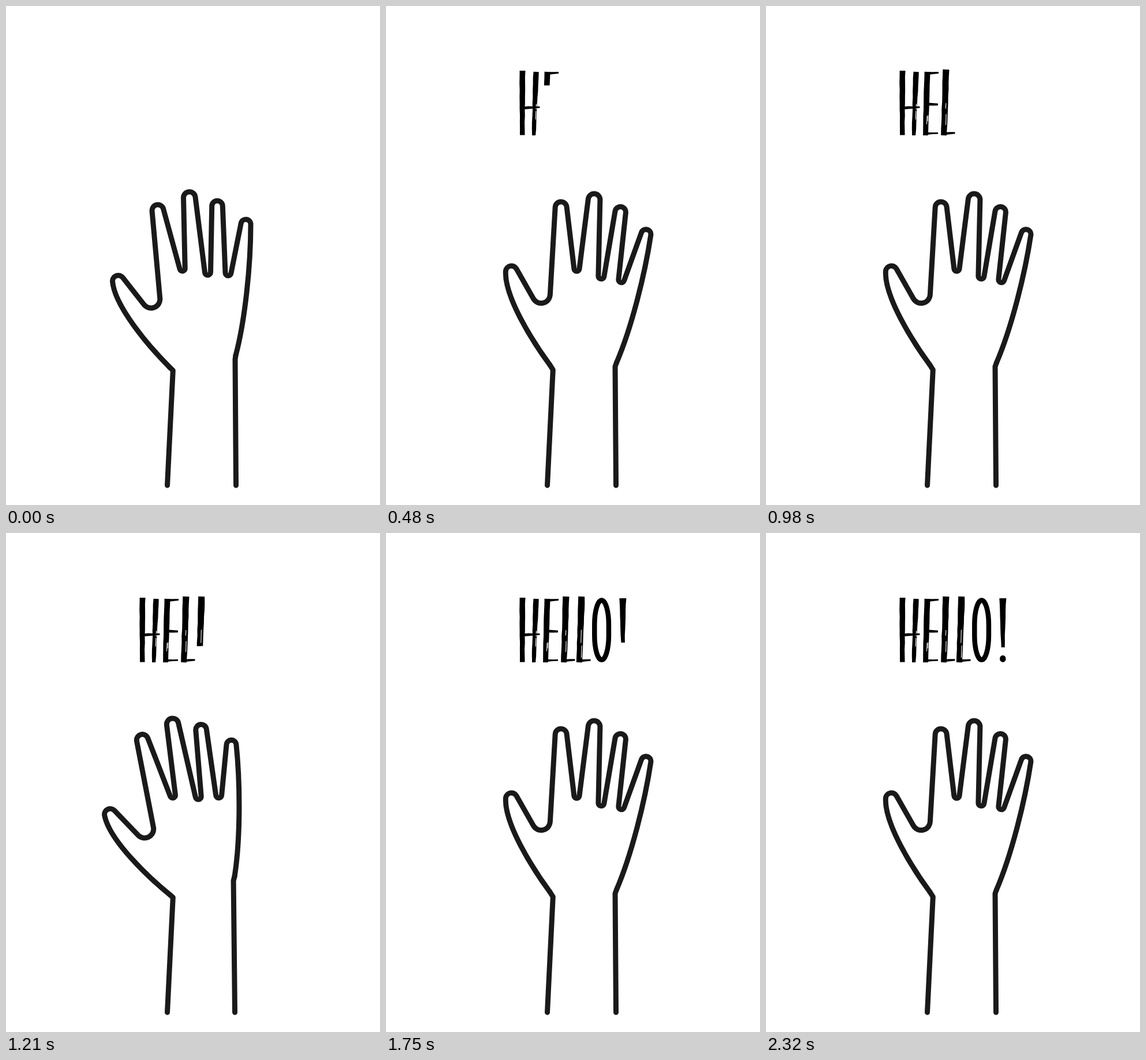
These frames come from a looping animation (648 px wide and 864 px high, 2420 ms). An HTML page:

```html
<!DOCTYPE html>
<html lang="en">
<head>
<meta charset="utf-8">
<title>Hello</title>
<style>
  html, body { margin: 0; width: 100%; height: 100%; overflow: hidden; background: #fff; }
  svg { display: block; width: 100%; height: 100%; }
  .line { fill: none; stroke: #1a1a1a; stroke-width: 9; stroke-linecap: round; stroke-linejoin: round; }
  .dry { fill: none; stroke: #fff; stroke-width: 1.1; stroke-linecap: round; }
  .ring { fill: none; stroke: #000; stroke-width: 8.5; }
</style>
</head>
<body>
<svg viewBox="0 0 648 864" role="img" aria-label="HELLO!">
  <g id="word"></g>
  <path id="hand" class="line"/>
  <path id="arms" class="line"/>
</svg>
<script>
const LOOP = 2420;
const $ = id => document.getElementById(id);
const hand = $("hand"), arms = $("arms"), word = $("word");

function add(parent, name, attrs = {}) {
  const el = document.createElementNS("http://www.w3.org/2000/svg", name);
  for (const key in attrs) el.setAttribute(key, attrs[key]);
  return parent.appendChild(el);
}

let seed = 7;
const rand = () => (seed = seed * 16807 % 2147483647) / 2147483647;
const mix = (a, b, k) => a + (b - a) * k;

// --- Lettering: tapered brush strokes with slightly rough edges ---
function brush(g, x0, y0, x1, y1, w0, w1) {
  const len = Math.hypot(x1 - x0, y1 - y0), steps = Math.ceil(len / 12);
  const nx = -(y1 - y0) / len, ny = (x1 - x0) / len;
  const near = [], far = [];
  for (let i = 0; i <= steps; i++) {
    const k = i / steps, x = mix(x0, x1, k), y = mix(y0, y1, k);
    const edge = () => mix(w0, w1, k) / 2 + rand() * 0.8 - 0.4;
    const a = edge(), b = edge();
    near.push([x + nx * a, y + ny * a]);
    far.unshift([x - nx * b, y - ny * b]);
  }
  add(g, "path", { d: "M" + [...near, ...far].join("L") + "Z" });
}

function stem(g, x0, y0, x1, y1, w0, w1, streaks = 2) {
  brush(g, x0, y0, x1, y1, w0, w1);
  for (let i = 0; i < streaks; i++) {
    const y = mix(y0, y1, 0.45 + rand() * 0.3), x = mix(x0, x1, 0.7) + 1.5 + rand() * 2;
    add(g, "path", { class: "dry", d: `M${x} ${y}l-.5 ${8 + rand() * 14}` });
  }
}

const bar = (g, x0, y0, x1, y1) => brush(g, x0, y0, x1, y1, 5, 3);

function drawL(g, x) {
  stem(g, x, 110, x - 4, 224, 11, 10);
  bar(g, x - 5, 221, x + 15.5, 220);
}

const letters = [
  g => {
    stem(g, 236.2, 112, 236.3, 223.5, 10, 8, 0);
    stem(g, 260, 114, 256, 224, 9.5, 6.5);
    bar(g, 238, 176.5, 266.5, 175);
  },
  g => {
    stem(g, 279.5, 114, 276.5, 224, 10, 9);
    bar(g, 275, 116.5, 299, 115.5);
    bar(g, 278, 170, 298, 170.5);
    bar(g, 274, 221, 298, 220);
  },
  g => drawL(g, 312),
  g => drawL(g, 339),
  g => add(g, "rect", { class: "ring", x: 361.3, y: 116.5, width: 24.6, height: 103, rx: 12.3, ry: 42 }),
  g => {
    stem(g, 410.3, 113, 410.5, 198, 11.5, 6, 0);
    add(g, "ellipse", { cx: 410.3, cy: 217.7, rx: 5.3, ry: 6 });
  }
];

const masks = letters.map((drawLetter, i) => {
  drawLetter(add(word, "g", { "clip-path": `url(#wipe${i})` }));
  const clip = add(word, "clipPath", { id: "wipe" + i });
  return add(clip, "rect", { x: 200, y: 108, width: 240 });
});

// --- Hand: round turns, alternately fingertip and gap, joined by tangents ---
const turns = [
  [194.5, 476.5, 10], [251.3, 507.5, 15.5],
  [263, 354, 10], [305.6, 454.4, 4.6],
  [317.8, 332, 10.3], [349.5, 461, 5],
  [366, 346.5, 9.3], [385, 462, 5],
  [415.5, 378, 8.5]
];
const wristL = [284, 626], wristR = [398, 605];

function handPath() {
  const [tx, ty, tr] = turns[0], [px, py, pr] = turns.at(-1);
  let d = `M${wristL} C248 590 188 520 ${tx - tr} ${ty}`;
  for (let i = 0; i < turns.length - 1; i++) {
    const [x1, y1, r1] = turns[i], [x2, y2, r2] = turns[i + 1];
    const side = i % 2 ? -1 : 1;
    const dist = Math.hypot(x2 - x1, y2 - y1);
    const a = Math.atan2(y2 - y1, x2 - x1) + side * Math.asin((r1 + r2) / dist);
    const mx = -Math.sin(a) * side, my = Math.cos(a) * side;
    d += `A${r1} ${r1} 0 0 ${i % 2 ? 0 : 1} ${x1 - r1 * mx} ${y1 - r1 * my}`;
    d += `L${x2 + r2 * mx} ${y2 + r2 * my}`;
  }
  return d + `A${pr} ${pr} 0 0 1 ${px + pr} ${py} C424 450 414 545 ${wristR}`;
}
hand.setAttribute("d", handPath());

// --- Motion ---
const pivot = [320, 620];
const angles = [-17, -10.5, -5.8, 0, 8.5, 16.8, 22.8, 29.1];
// time and pose at each turn of the wave
const swing = [[0, 3.4], [160, 1], [725, 7], [1380, 0], [2065, 7], [LOOP, 3.45]];

function angleAt(t) {
  const i = swing.findIndex(([end]) => t < end);
  const [t0, p0] = swing[i - 1], [t1, p1] = swing[i];
  return angles[Math.round(mix(p0, p1, (t - t0) / (t1 - t0)))];
}

function drawHand(t) {
  const deg = angleAt(t), bend = Math.max(0, deg);
  const dx = 0.00034 * deg ** 3, dy = 0.28 * deg - 0.026 * deg ** 2;
  const a = deg * Math.PI / 180, c = Math.cos(a), s = Math.sin(a);
  const place = ([x, y]) => {
    const rx = x - pivot[0], ry = y - pivot[1];
    return [pivot[0] + dx + rx * c - ry * s, pivot[1] + dy + rx * s + ry * c];
  };
  const left = place(wristL), right = place(wristR);
  const elbowL = [289.3, 631 - 0.0155 * bend ** 2];
  const elbowR = [397 + Math.min(0, deg) / 2, right[1] + 7];
  hand.setAttribute("transform", `translate(${dx} ${dy}) rotate(${deg} ${pivot})`);
  arms.setAttribute("d",
    `M279.5 830 L${elbowL} L${left} M${deg < 0 ? 396.5 : 398.5} 830 L${elbowR} L${right}`);
}

function drawWord(t) {
  masks.forEach((rect, i) => {
    const start = 88 + 350 * i - 9.3 * i * i;
    const k = Math.min(1, Math.max(0, (t - start) / 210));
    rect.setAttribute("height", 118 * k);
  });
}

const begin = performance.now();
function draw(now) {
  const t = Math.max(0, now - begin) % LOOP;
  drawHand(t);
  drawWord(t);
  requestAnimationFrame(draw);
}
draw(begin);
</script>
</body>
</html>
```
